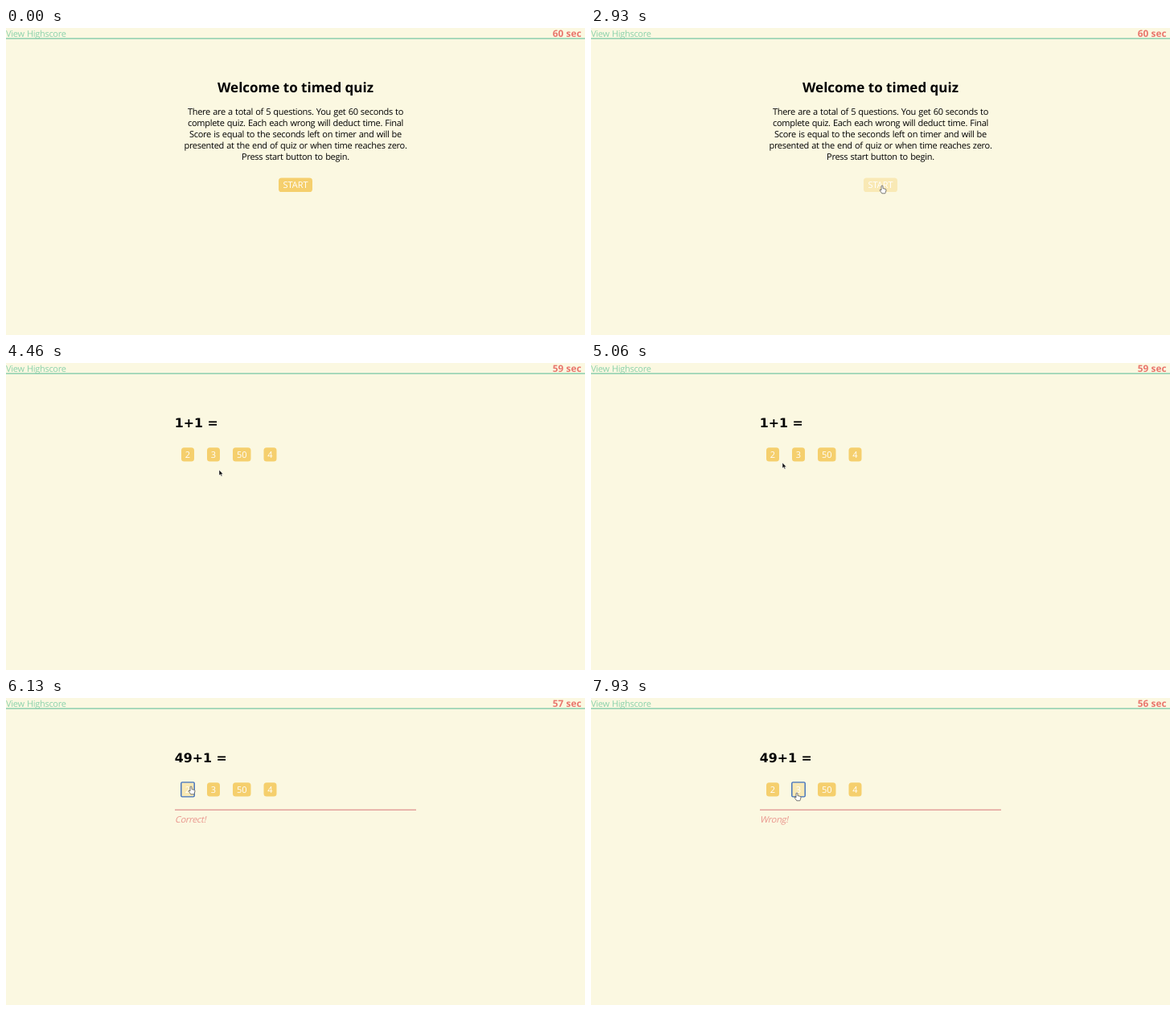
Animation of 720 by 382 pixels, one loop 8 s. Source, as an HTML page:

```html
<!DOCTYPE html>
<html lang="en">
<head>
<meta charset="utf-8">
<title>Timed quiz</title>
<style>
html, body { margin: 0; width: 100%; height: 100%; overflow: hidden; background: #fbf8e1; }
svg { display: block; width: 100%; height: 100%; }
text {
  font: 11px "Open Sans", "Noto Sans", sans-serif;
  letter-spacing: -.28px; word-spacing: .6px;
  text-rendering: geometricPrecision;
}
.mid { text-anchor: middle; }
.title { font-size: 17px; font-weight: 700; letter-spacing: 0; word-spacing: 0; }
.sum { font: 700 15.8px "DejaVu Sans", Verdana, sans-serif; letter-spacing: 0; word-spacing: 0; }
.timer { font-size: 11.8px; font-weight: 700; letter-spacing: .1px; word-spacing: 0; fill: #e9776d; }
.link { fill: #8bd2ab; }
.msg { fill: #e9968d; }
.btn rect { fill: #f5cf6d; }
.btn text { fill: #fff; letter-spacing: 0; }
.ring { fill: none; stroke: #3b6db9; stroke-width: 1.4; }
</style>
</head>
<body>
<svg viewBox="0 0 720 382" preserveAspectRatio="none">
  <rect width="720" height="382" fill="#fbf8e1"/>
  <text class="link" x="0" y="10.5">View Highscore</text>
  <text class="timer" id="timer" x="679.7" y="10.7">60 sec</text>
  <rect y="12.4" width="720" height="1.5" fill="#8dd0ae"/>

  <g id="intro">
    <text class="title mid" x="360" y="80">Welcome to timed quiz</text>
  </g>

  <g id="quiz">
    <text class="sum" id="sum" x="209.7" y="80">1+1 =</text>
    <rect class="ring" id="ring" y="104.9" width="16.4" height="18" rx="1.3"/>
    <g id="result">
      <rect x="210" y="138.5" width="300" height="1.5" fill="#e3a29c"/>
      <text class="msg" id="msg" transform="translate(210 154.7) skewX(-13)"></text>
    </g>
  </g>

  <path id="arrow" d="M0 0v7l1.6-1.4 1.1 2.5 1.2-.5-1.1-2.4h2.1z"
        fill="#111" stroke="#fff" stroke-width=".5"/>
  <path id="hand" d="M-1 1a1 1 0 0 1 2 0v2.6l3 .7q1.2 .3 1 1.6l-.6 2.4-.6 1.5h-4l-2.4-3.4q-.7-1.3.6-1.3l1 .8z"
        fill="#fff" stroke="#555" stroke-width=".8" stroke-linejoin="round"/>
</svg>
<script>
const LOOP = 8000;
const $ = id => document.getElementById(id);

function add(parent, tag, attrs, text) {
  const el = document.createElementNS("http://www.w3.org/2000/svg", tag);
  for (const k in attrs) el.setAttribute(k, attrs[k]);
  if (text) el.textContent = text;
  parent.append(el);
  return el;
}

function button(parent, x, y, w, label) {
  const g = add(parent, "g", { class: "btn" });
  const box = add(g, "rect", { x, y, width: w, height: 17.4, rx: 3.6 });
  add(g, "text", { class: "mid", x: x + w / 2, y: y + 12.7 }, label);
  return box;
}

[
  "There are a total of 5 questions. You get 60 seconds to",
  "complete quiz. Each each wrong will deduct time. Final",
  "Score is equal to the seconds left on timer and will be",
  "presented at the end of quiz or when time reaches zero.",
  "Press start button to begin."
].forEach((line, i) => add($("intro"), "text", { class: "mid", x: 360, y: 108 + i * 14 }, line));

const start = button($("intro"), 339, 186.6, 42, "START");
const answers = [[218, 16, "2"], [250, 16, "3"], [282, 22.5, "50"], [320.5, 16, "4"]]
  .map(([x, w, label]) => button($("quiz"), x, 105.2, w, label));
$("quiz").append($("ring"));

// Each track holds [time, value...]; a value stays until the next step.
const tracks = {
  page: [[0, "intro"], [3130, "quiz"]],
  timer: [[0, 60], [4130, 59], [5130, 58], [6130, 57], [7130, 56]],
  sum: [[0, "1+1 ="], [6000, "49+1 ="]],
  msg: [[0, ""], [6000, "Correct!"], [7930, "Wrong!"]],
  ring: [[0, 0], [5860, 217.8], [7800, 249.8]],
  start: [[0, 0], [400, .5], [530, 1]],
  two: [[0, 0], [5130, .5], [5330, 1], [7000, 0]],
  three: [[0, 0], [7067, .5], [7130, 1]],
  cursor: [
    [0, ""], [400, "hand", 362, 196], [3130, ""],
    [3730, "arrow", 342, 192], [3800, "arrow", 304, 161], [3930, "arrow", 270, 134],
    [4330, "arrow", 267, 133.5], [4460, "arrow", 265, 133],
    [4600, "arrow", 263, 134], [4667, "arrow", 259, 132], [4800, "arrow", 252, 129],
    [4867, "arrow", 245, 126], [5000, "arrow", 238, 124], [5067, "arrow", 234, 122],
    [5130, "hand", 231, 113], [5330, "hand", 230, 110],
    [7000, "arrow", 249.7, 117.5], [7067, "hand", 252, 116.5], [7130, "hand", 254, 116],
    [7330, "hand", 255, 117], [7400, "hand", 256, 118]
  ]
};

const at = (name, t) => tracks[name].findLast(step => step[0] <= t).slice(1);
const show = (el, on) => el.style.display = on ? "" : "none";
const hover = (box, level) => box.setAttribute("fill-opacity", 1 - .62 * level);
const write = (el, text) => { if (el.textContent !== text) el.textContent = text; };

function draw(t) {
  const get = name => at(name, t)[0];
  const page = get("page"), ring = get("ring"), msg = get("msg");
  show($("intro"), page === "intro");
  show($("quiz"), page === "quiz");
  write($("timer"), get("timer") + " sec");
  write($("sum"), get("sum"));
  write($("msg"), msg);
  show($("result"), msg);
  show($("ring"), ring);
  $("ring").setAttribute("x", ring);
  hover(start, get("start"));
  hover(answers[0], get("two"));
  hover(answers[1], get("three"));

  const [kind, x, y] = at("cursor", t);
  for (const name of ["arrow", "hand"]) {
    show($(name), name === kind);
    if (name === kind) $(name).setAttribute("transform", `translate(${x} ${y})`);
  }
}

const began = performance.now();
function tick() {
  draw((performance.now() - began) % LOOP);
  requestAnimationFrame(tick);
}
tick();
</script>
</body>
</html>
```
